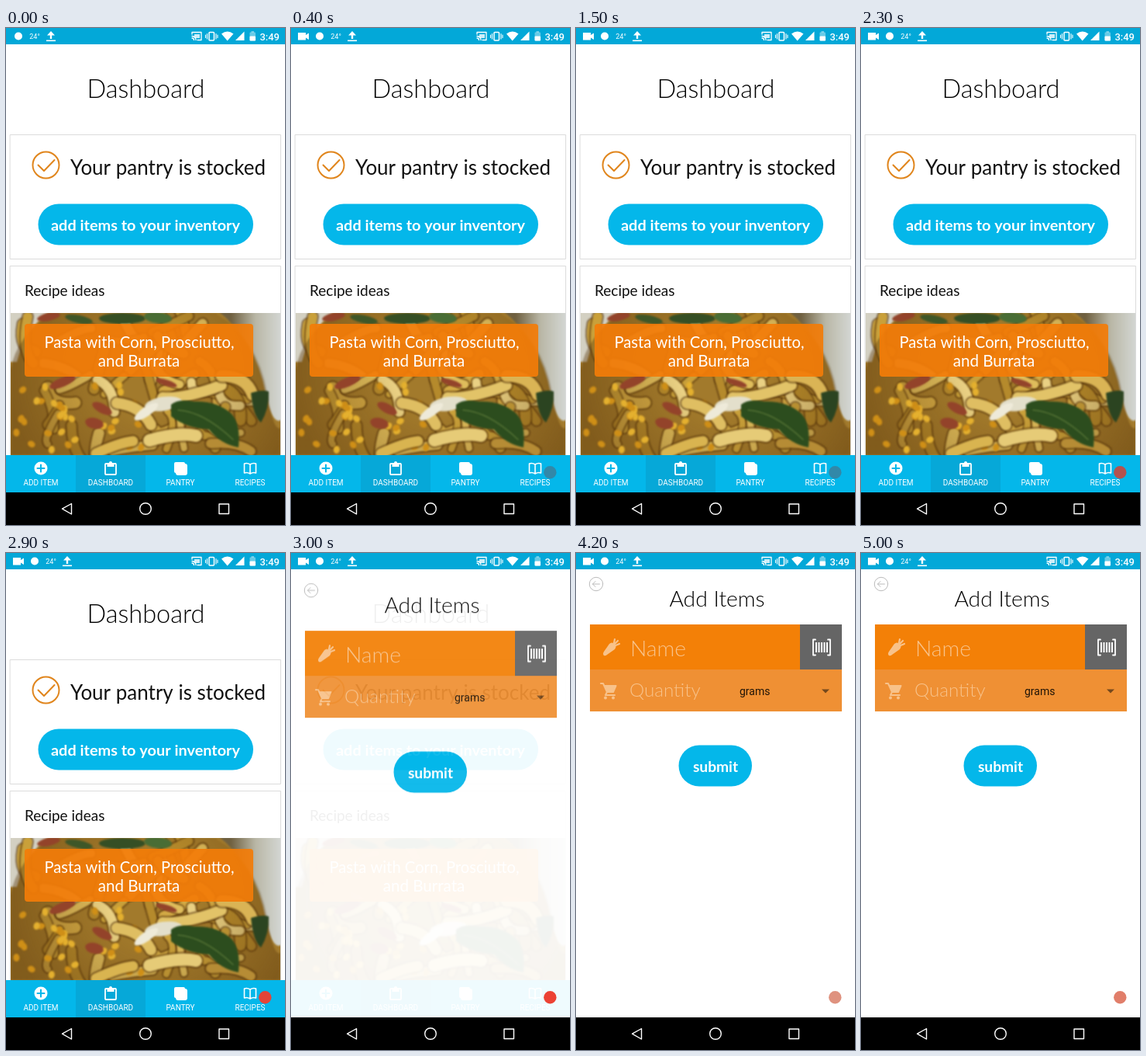
These frames come from a looping animation (360x640 px, 5.1 s). An HTML page with a canvas:

```html
<!DOCTYPE html>
<html lang="en">
<head>
<meta charset="utf-8">
<title>Pantry app</title>
<style>
html, body { margin: 0; width: 100%; height: 100%; overflow: hidden; background: #fff; }
canvas { display: block; width: 360px; height: 640px; }
</style>
</head>
<body>
<canvas id="stage"></canvas>
<script>
const W = 360, H = 640, LOOP = 5100, STEP = 100;
const TOP = 21, BOTTOM = 598;
const BLUE = '#04b7ea', ORANGE = '#f38007';
const HEAD = 'Lato, sans-serif', UI = 'Roboto, sans-serif';
const dpr = window.devicePixelRatio || 1;

function setup(canvas) {
  canvas.width = W * dpr;
  canvas.height = H * dpr;
  const c = canvas.getContext('2d');
  c.scale(dpr, dpr);
  c.lineCap = c.lineJoin = 'round';
  return c;
}

const stage = setup(document.getElementById('stage'));
let ctx = stage;

function layer(draw) {
  const canvas = document.createElement('canvas');
  ctx = setup(canvas);
  draw();
  ctx = stage;
  return canvas;
}

function rect(x, y, w, h, color, r = 0) {
  ctx.fillStyle = color;
  ctx.beginPath();
  ctx.roundRect(x, y, w, h, r);
  ctx.fill();
}

function frame(x, y, w, h, color, width = 1, r = 0) {
  ctx.strokeStyle = color;
  ctx.lineWidth = width;
  ctx.beginPath();
  ctx.roundRect(x, y, w, h, r);
  ctx.stroke();
}

function disc(x, y, r, color) {
  ctx.fillStyle = color;
  ctx.beginPath();
  ctx.arc(x, y, r, 0, 7);
  ctx.fill();
}

function ring(x, y, r, color, width) {
  ctx.strokeStyle = color;
  ctx.lineWidth = width;
  ctx.beginPath();
  ctx.arc(x, y, r, 0, 7);
  ctx.stroke();
}

function line(d, color, width) {
  ctx.strokeStyle = color;
  ctx.lineWidth = width;
  ctx.stroke(new Path2D(d));
}

function fill(d, color) {
  ctx.fillStyle = color;
  ctx.fill(new Path2D(d));
}

function text(str, x, y, size, color, { font = HEAD, weight = 400, align = 'center' } = {}) {
  ctx.font = `${weight} ${size}px ${font}`;
  ctx.textAlign = align;
  ctx.fillStyle = color;
  ctx.fillText(str, x, y);
}

function blob(x, y, rx, ry, angle, color) {
  ctx.fillStyle = color;
  ctx.beginPath();
  ctx.ellipse(x, y, rx, ry, angle, 0, 7);
  ctx.fill();
}

function random(seed) {
  return () => (seed = (seed * 16807) % 2147483647) / 2147483647;
}

function ribbon(x, y, dx, dy, bend, width, color) {
  const d = `M${x - dx} ${y - dy}Q${x + bend} ${y - bend} ${x + dx} ${y + dy}`;
  line(d, 'rgba(84,50,10,.6)', width + 4);
  line(d, color, width);
}

function pastaPhoto() {
  const rnd = random(77);
  ctx.save();
  ctx.beginPath();
  ctx.rect(6, 367, 348, 183);
  ctx.clip();
  ctx.filter = `blur(${1.2 * dpr}px)`;
  rect(0, 360, W, 200, '#a27a2c');

  const plate = ctx.createLinearGradient(290, 0, 354, 0);
  plate.addColorStop(0, '#6f6040');
  plate.addColorStop(0.5, '#b9b7a6');
  plate.addColorStop(1, '#d3d6d2');
  fill('M268 360H360V500Q345 520 335 470Q322 400 268 360Z', plate);
  fill('M0 360H64Q26 382 14 430H0Z', '#d3d0c2');

  const tones = ['#c9a03a', '#dfbd5c', '#b58a2c', '#e9d083', '#d2a945'];
  for (let i = 0; i < 42; i++) {
    const x = 30 + rnd() * 270, y = 378 + rnd() * 165;
    const a = rnd() * 6.28, l = 14 + rnd() * 18;
    ribbon(x, y, Math.cos(a) * l, Math.sin(a) * l, rnd() * 30 - 15, 8 + rnd() * 6, tones[i % 5]);
  }

  const shade = ctx.createRadialGradient(190, 440, 60, 190, 440, 190);
  shade.addColorStop(0, 'rgba(90,55,10,0)');
  shade.addColorStop(1, 'rgba(90,55,10,.45)');
  fill('M6 440Q14 395 60 367H270Q325 400 337 470Q345 520 354 515V550H6Z', shade);

  for (let i = 0; i < 34; i++) {
    const x = i % 3 ? 10 + rnd() * 80 : 105 + rnd() * 75;
    const y = 460 + rnd() * 85;
    blob(x, y, 5, 4, rnd() * 3, i % 2 ? '#cf8f17' : '#e4b02f');
  }

  // Broad noodles around the leaf.
  ribbon(215, 528, 30, -3, 8, 16, '#e6cb77');
  ribbon(165, 497, 22, 14, 10, 14, '#dfbe62');
  ribbon(240, 468, 38, -8, -10, 14, '#e2c368');
  ribbon(298, 460, 20, 12, 12, 15, '#dab455');
  ribbon(140, 540, 24, -8, 6, 13, '#d9b450');
  ribbon(290, 540, 26, 5, 8, 12, '#b68c35');

  [[73, 456, 18, 6, -0.4], [124, 490, 14, 6, 0.5], [114, 509, 12, 7, 0.2],
   [207, 457, 14, 4, 0.3], [55, 372, 15, 5, -0.2]]
    .forEach(([x, y, rx, ry, a]) => blob(x, y, rx, ry, a, '#93432a'));

  blob(203, 484, 24, 9, -0.15, '#e3dfcb');
  blob(181, 494, 18, 6, -0.6, '#eeead9');

  fill('M213 485Q222 477 243 481Q273 480 291 497Q303 510 300 540Q277 536 262 517Q232 515 213 500Z', '#2c4d1e');
  line('M222 492Q255 494 293 530', '#557335', 1.5);
  fill('M316 470Q330 465 339 468Q340 490 329 508Q319 500 316 470Z', '#2b4421');
  blob(150, 374, 30, 7, 0, '#354f25');
  blob(196, 373, 18, 7, 0.1, '#496d35');
  blob(94, 375, 18, 5, 0.2, '#3f5728');
  ctx.restore();
}

function tabBar() {
  rect(0, 550, W, 48, BLUE);
  rect(90, 550, 90, 48, '#06a8d8');
  disc(45, 567, 8.5, '#fff');
  line('M40.5 567H49.5M45 562.5V571.5', BLUE, 2);
  frame(128, 561, 14, 14, '#fff', 1.8, 1);
  rect(130.5, 560, 9, 5, '#fff');
  disc(135, 560, 2, '#fff');
  rect(217, 559, 14, 14, '#fff', 2);
  rect(219, 561, 15, 15, '#fff', 3);
  line('M315 562Q311 559.5 307.5 561V573Q311 571.5 315 574Q319 571.5 322.5 573V561Q319 559.5 315 562V574', '#fff', 1.6);
  ['ADD ITEM', 'DASHBOARD', 'PANTRY', 'RECIPES'].forEach((label, i) =>
    text(label, 45 + i * 90, 589, 10, '#fff', { font: UI }));
}

function dashboard() {
  rect(0, 0, W, H, '#fff');
  text('Dashboard', 180.5, 90, 32.5, '#000', { weight: 300 });
  frame(5.5, 137.5, 349, 160, '#dcdcdc');
  ring(51.5, 176.5, 17, '#e0851c', 2);
  line('M41.5 176.5L49 184L62.5 170', '#e0851c', 2);
  text('Your pantry is stocked', 83, 189, 26, '#111', { align: 'left' });
  rect(41.5, 226.5, 277.5, 53, BLUE, 26.5);
  text('add items to your inventory', 180, 260.5, 19.9, '#fff', { weight: 700 });
  frame(5.5, 306.5, 349, 260, '#dcdcdc');
  text('Recipe ideas', 24, 345, 19, '#111', { align: 'left' });
  pastaPhoto();
  rect(24, 381, 295, 68, 'rgba(243,124,8,.92)', 4);
  text('Pasta with Corn, Prosciutto,', 172, 411.5, 20.2, '#fff');
  text('and Burrata', 171.5, 436, 20.6, '#fff');
  tabBar();
}

function scanIcon() {
  line('M309 111.5H306V131.5H309M325 111.5H328V131.5H325', '#fff', 1.8);
  for (let x = 309; x < 326; x += 3.5) rect(x, 115, 2, 13, '#fff');
}

function addItems() {
  const pale = '#f8c28a';
  rect(0, 0, W, H, '#fff');
  ring(26, 40, 8.7, '#bbb', 1);
  line('M30.5 40H21.5M25 36.5L21.5 40L25 43.5', '#bbb', 1);
  text('Add Items', 182, 69, 28.3, '#000', { weight: 300 });
  rect(18, 92, 271, 58, ORANGE);
  rect(289, 92, 54, 58, '#656565');
  rect(18, 150, 325, 54, '#ef9034');
  fill('M36 132Q34 130 36 127L43 117Q46 114 50 117Q53 120 50 124L40 131Q38 133 36 132Z', pale);
  line('M49 116L50 111M50 117L54 113M51 119L56 117', pale, 2.2);
  text('Name', 70, 132.5, 28.3, pale, { weight: 300, align: 'left' });
  line('M32 168H35L40 179H48L51.5 171H37M40 179L38 183H50', pale, 2);
  fill('M36.5 171H51.5L48 179H40Z', pale);
  disc(38, 186.5, 2, pale);
  disc(48, 186.5, 2, pale);
  text('Quantity', 69, 185, 24.2, pale, { weight: 300, align: 'left' });
  text('grams', 211, 182.5, 14, '#211507', { font: UI, align: 'left' });
  fill('M317 175.5H327L322 180.5Z', '#75481d');
  scanIcon();
  rect(132.5, 247.5, 94.5, 53, BLUE, 26.5);
  text('submit', 180, 281.5, 19.2, '#fff', { weight: 700 });
}

function statusBar(recording) {
  rect(0, 0, W, TOP, '#03a8d8');
  const shift = recording ? 21 : 0;
  if (recording) fill('M9 6H19V9L23 6.5V15L19 12.5V15.5H9Z', '#fff');
  disc(16 + shift, 10.5, 5, '#fff');
  text('24°', 37 + shift, 13.5, 9, '#fff', { font: UI });
  ctx.save();
  ctx.translate(58 + shift, 0);
  fill('M0 4L5 9.5H1.2V14H-1.2V9.5H-5Z', '#fff');
  rect(-6, 15.5, 12, 1.6, '#fff');
  ctx.restore();

  line('M240 8V5.5H252V15.5H247M240 10.5Q245 11 245 15.5M240 13Q242.5 13 242.5 15.5', '#fff', 1.3);
  rect(243, 8, 7, 5, 'rgba(255,255,255,.8)');
  frame(262, 5.5, 6.5, 10.5, '#fff', 1.5, 1);
  line('M259.5 7.5V14M257.5 9V12.5M271 7.5V14M273 9V12.5', '#fff', 1.1);
  fill('M278 7.5Q285.7 1.5 293.5 7.5L285.7 16.5Z', '#fff');
  fill('M296 16H307.5V4.5Z', '#fff');
  rect(314.5, 5.5, 7.5, 11, 'rgba(255,255,255,.4)', 1);
  rect(316.5, 4, 3.5, 2, 'rgba(255,255,255,.4)');
  rect(314.5, 10.5, 7.5, 6, '#fff', 1);
  text('3:49', 353, 15.5, 13, '#fff', { font: UI, weight: 500, align: 'right' });
}

function navBar() {
  rect(0, BOTTOM, W, H - BOTTOM, '#000');
  line('M84.5 612.5V626L72.5 619.2Z', '#fff', 1.4);
  ring(180, 619, 7.3, '#fff', 1.4);
  frame(275, 613, 12.5, 12.5, '#fff', 1.4);
}

// Time and colour stops of the recording dot.
const dotStops = [
  [100, [50, 136, 168]], [1500, [50, 136, 168]], [2300, [180, 82, 78]],
  [3000, [236, 66, 52]], [3500, [221, 163, 146]], [5000, [225, 126, 106]]
];

function dotColor(t) {
  const i = Math.max(1, dotStops.findIndex(([time]) => t <= time));
  const [t0, from] = dotStops[i - 1], [t1, to] = dotStops[i];
  const k = (t - t0) / (t1 - t0);
  return `rgb(${from.map((v, n) => Math.round(v + (to[n] - v) * k))})`;
}

const home = layer(dashboard), form = layer(addItems);
const OPEN = 2900, SLIDE = 350, FADE = 200, RISE = 44;
const remaining = (t, duration) => 1 - Math.min(1, Math.max(0, (t - OPEN) / duration));

function render(now) {
  const t = Math.floor((now % LOOP) / STEP) * STEP;
  ctx.drawImage(home, 0, 0, W, H);
  if (t >= OPEN) {
    ctx.save();
    ctx.beginPath();
    ctx.rect(0, TOP, W, BOTTOM - TOP);
    ctx.clip();
    ctx.globalAlpha = 1 - remaining(t, FADE) ** 4;
    ctx.drawImage(form, 0, RISE * remaining(t, SLIDE) ** 5, W, H);
    ctx.restore();
  }
  statusBar(t >= 100);
  navBar();
  if (t >= 100) disc(334.3, 572.3, 8.2, dotColor(t));
}

const start = performance.now();
function tick() {
  render(performance.now() - start);
  requestAnimationFrame(tick);
}
tick();
</script>
</body>
</html>
```
